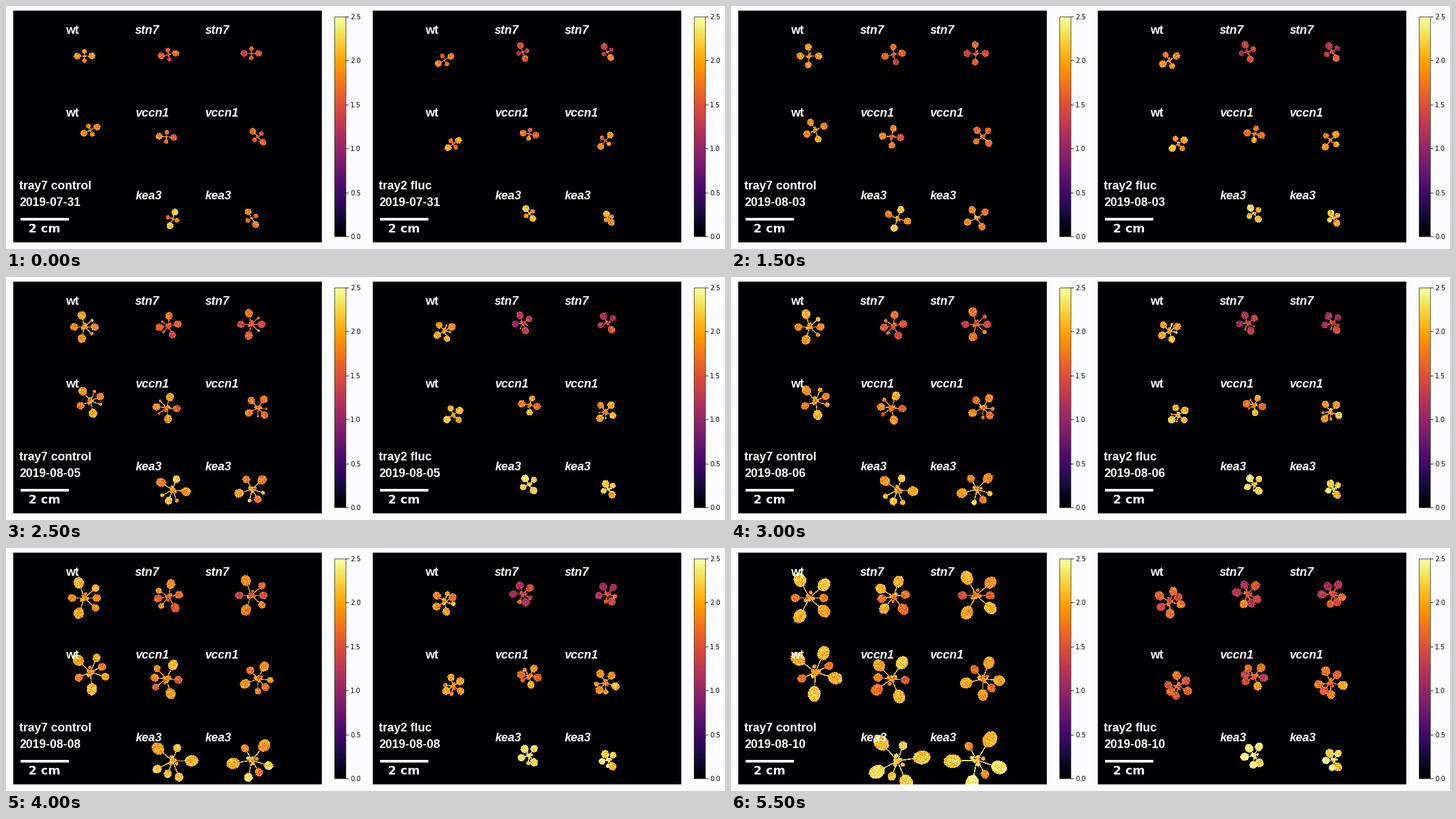
A matplotlib script for the animation above (6000 ms loop, 1086x367 px).

```python
import numpy as np
import matplotlib.pyplot as plt
from matplotlib.animation import FuncAnimation
from matplotlib.patches import Rectangle

W, H, DPI = 1086, 367, 64
PT = 72 / DPI                    # points per pixel
FRAMES, INTERVAL = 12, 500
LEFT, TOP, WIDE, HIGH = 11, 7, 466, 350
SHIFT = 543                      # distance between the two trays
VMAX = 2.5
REACH, MARGIN = 64, 80           # half size of a plant's grid, padding of a tray

LABELS = (("wt", "stn7", "stn7"), ("wt", "vccn1", "vccn1"), ("", "kea3", "kea3"))
GENOTYPES = [name for row in LABELS for name in row if name]

# x, y, heading of the seed leaves in degrees, final spread
CONTROL = [(118, 75, 180, 31), (245, 73, -10, 24), (370, 71, 180, 30),
           (127, 187, 155, 33), (242, 197, 5, 29), (380, 197, 228, 26),
           (251, 321, -70, 37), (371, 320, 240, 37)]
FLUC = [(119, 81, 150, 18), (237, 69, 250, 17), (365, 69, 240, 16),
        (132, 208, -35, 16), (247, 193, 10, 16), (362, 203, -50, 19),
        (247, 313, 235, 15), (367, 320, 240, 12)]

# mean signal at the start, past the middle and at the end
CONTROL_SIGNAL = {"wt": (1.9, 1.95, 2.0), "stn7": (1.55, 1.6, 1.85),
                  "vccn1": (1.65, 1.85, 1.95), "kea3": (1.9, 2.05, 2.2)}
FLUC_SIGNAL = {"wt": (1.75, 2.1, 1.6), "stn7": (1.6, 1.4, 1.5),
               "vccn1": (1.7, 1.9, 1.65), "kea3": (2.0, 2.35, 2.45)}

GY, GX = np.mgrid[-REACH:REACH + 1, -REACH:REACH + 1]


def mix(first, last, t):
    return first + (last - first) * t


def leaf_pose(k, heading, spread, t):
    """Angle, distance and radius of leaf k; leaves come in pairs."""
    pair, side = k // 2, 1 - 2 * (k % 2)
    if pair == 0:
        return (heading + 90 - 90 * side,
                mix(min(11, 0.6 * spread), 6 + 0.5 * spread, t), mix(5, 6.2, t))
    if pair == 1:
        return (heading + side * mix(90, 62, t),
                mix(min(7, 0.4 * spread), spread, t), mix(3.5, 3 + 0.2 * spread, t))
    return (heading + 180 + side * 42,
            mix(3, 0.95 * spread, t), mix(-3, 2.5 + 0.2 * spread, t))


def rosette(heading, spread, level, t, seed):
    """Pixel values of one plant on a local grid, zero where empty."""
    count = 6 if spread > 15 else 5
    tones = np.random.default_rng(seed).normal(0, 0.15, count)
    rng = np.random.default_rng((seed, int(1000 * t)))
    grain = rng.normal(0, 0.24, GX.shape)
    ragged = rng.normal(1, 0.05, GX.shape)
    out = np.zeros(GX.shape)

    def paint(mask, value):
        out[mask] = np.clip(value + grain, 0.4, VMAX)[mask]

    blades = []
    for k, tone in enumerate(tones):
        angle, distance, radius = leaf_pose(k, heading, spread, t)
        if radius < 1:
            continue
        c, s = np.cos(np.radians(angle)), np.sin(np.radians(angle))
        along, across = GX * c + GY * s, GY * c - GX * s
        paint((along > 0) & (along < distance) & (abs(across) < 0.6 + 0.2 * t),
              level + 0.2)
        length = radius * (1 + 0.04 * max(0, radius - 4))
        blade = ((along - distance) / length) ** 2 + (across / radius) ** 2 < ragged
        aging = 0.25 * t * (k < 2) + 0.15 * (1 - t) * (k >= 2)
        blades.append((blade, level + 0.05 + tone - aging))
    for blade, value in blades:
        paint(blade, value)

    # young leaves crowd the heart in a spiral
    for k in range(6, -1, -1):
        angle = np.radians(heading + 137.5 * k)
        d = (0.3 + t * spread / 28) * k
        heart = np.hypot(GX - d * np.cos(angle), GY - d * np.sin(angle))
        paint(heart < 1.2 + t * spread / 18, level + 0.1 * (k % 3 - 1))
    return out


def tray_values(tray, signal, frame):
    t = frame / (FRAMES - 1)
    field = np.zeros((HIGH + 2 * MARGIN, WIDE + 2 * MARGIN))
    for (x, y, heading, spread), genotype in zip(tray, GENOTYPES):
        level = np.interp(t, (0, 0.6, 1), signal[genotype])
        patch = rosette(heading, spread, level, t, x + y)
        row, col = y - TOP + MARGIN - REACH, x - LEFT + MARGIN - REACH
        view = field[row:row + len(patch), col:col + len(patch)]
        np.maximum(view, patch, out=view)
    return field[MARGIN:-MARGIN, MARGIN:-MARGIN]


def date_text(frame):
    return "2019-07-31" if frame == 0 else f"2019-08-{min(frame, 10):02d}"


fig = plt.figure(figsize=(W / DPI, H / DPI), dpi=DPI, facecolor="#fcfcfe")
ax = fig.add_axes([0, 0, 1, 1])
ax.axis("off")


def label(x, y, text, font="Liberation Sans", **kw):
    return ax.text(x, y, text, color="white", fontsize=18 * PT, family=font,
                   weight="bold", va="baseline", **kw)


def build_colorbar(x0, x1, y0, y1):
    ax.imshow(np.linspace(1, 0, 256)[:, None], cmap="inferno",
              extent=(x0, x1, y1, y0), interpolation="nearest", aspect="auto")
    ax.add_patch(Rectangle((x0, y0), x1 - x0, y1 - y0, fill=False,
                           ec="#333310", lw=0.8 * PT))
    for value in np.arange(0, 2.6, 0.5):
        y = mix(y1, y0, value / VMAX)
        ax.plot([x1, x1 + 3.5], [y, y], color="black", lw=0.8 * PT)
        ax.text(x1 + 7, y, f"{value:.1f}", fontsize=10 * PT, family="DejaVu Sans",
                va="center_baseline")


def build_panel(dx, title):
    image = ax.imshow(np.zeros((HIGH, WIDE)), cmap="inferno", vmin=0, vmax=VMAX,
                      extent=(LEFT + dx, LEFT + WIDE + dx, TOP + HIGH, TOP),
                      interpolation="nearest", aspect="auto")
    for row, names in enumerate(LABELS):
        for col, name in enumerate(names):
            label(90 + 105.2 * col + dx, 42 + 125 * row, name,
                  style="normal" if name == "wt" else "italic")
    label(20 + dx, 277, title)
    date = label(20 + dx, 302, date_text(0))
    ax.add_patch(Rectangle((22 + dx, 320), 73, 4, color="white", lw=0, zorder=3))
    label(58.5 + dx, 342, "2 cm", "DejaVu Sans", ha="center")
    build_colorbar(496 + dx, 513 + dx, 16, 348)
    return image, date


panels = [(*build_panel(0, "tray7 control"), CONTROL, CONTROL_SIGNAL),
          (*build_panel(SHIFT, "tray2 fluc"), FLUC, FLUC_SIGNAL)]
ax.set_xlim(0, W)
ax.set_ylim(H, 0)


def update(frame):
    for image, date, tray, signal in panels:
        image.set_data(tray_values(tray, signal, frame))
        date.set_text(date_text(frame))
    return [artist for panel in panels for artist in panel[:2]]


anim = FuncAnimation(fig, update, frames=FRAMES, interval=INTERVAL, repeat=True,
                     repeat_delay=0, blit=False)
plt.show()
```
